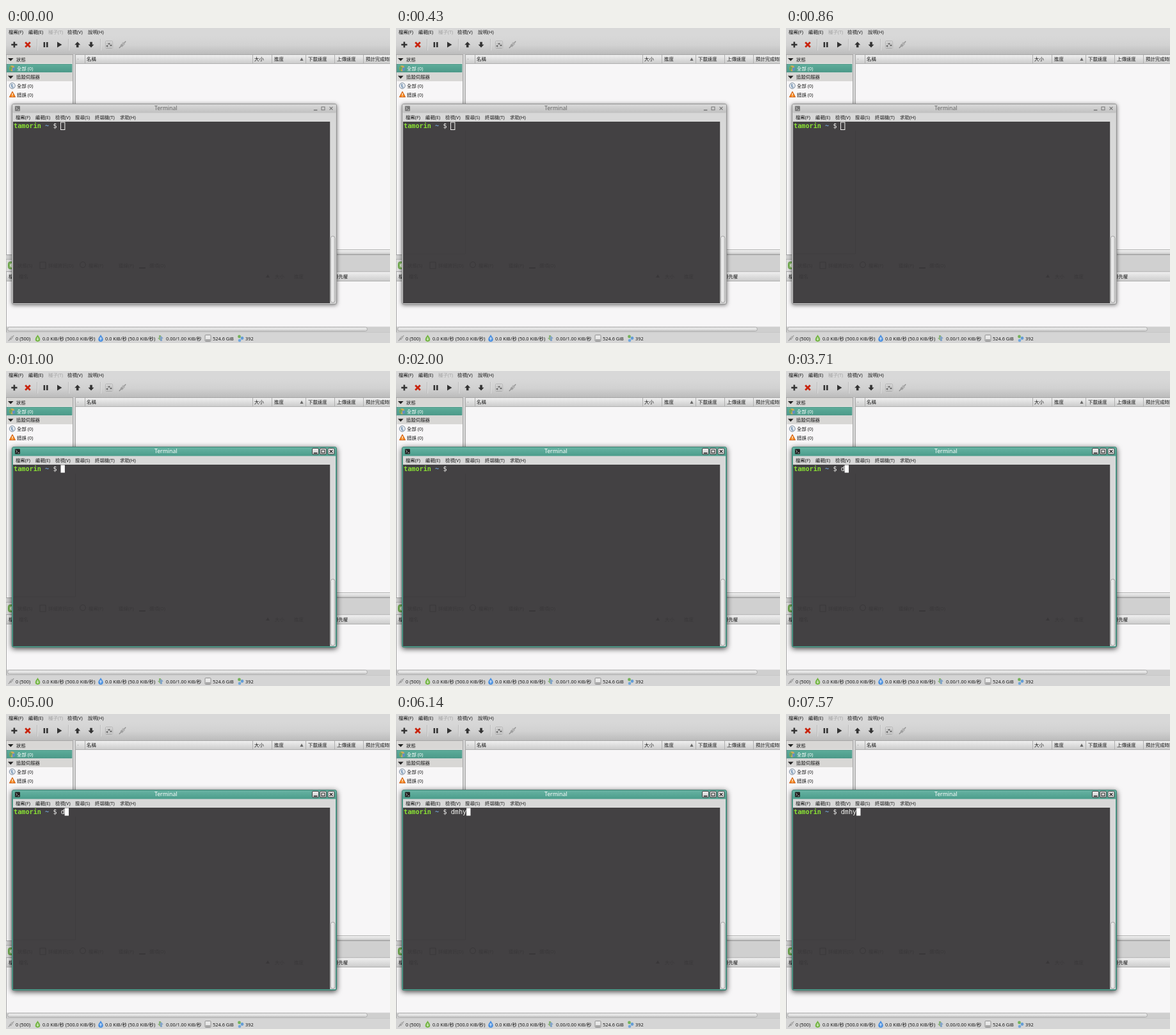
Write an HTML page that moves like this. It is 600 px wide and 491 px high and loops after 8 s.

```html
<!DOCTYPE html>
<html lang="zh-Hant">
<head>
<meta charset="utf-8">
<title>Terminal</title>
<style>
html, body { margin: 0; width: 100%; height: 100%; overflow: hidden; background: #d4d4d4; }
svg { display: block; width: 100vw; height: 100vh; }
text { font: 7.4px "Noto Sans", "Noto Sans CJK TC", "Noto Sans CJK", sans-serif; fill: #1c1c1c; white-space: pre; }
text.mono { font: 10.2px "DejaVu Sans Mono", monospace; fill: #f2f2f0; }
text.bold { font-weight: bold; }
text.title { font-size: 8.7px; }
.ghost text { fill: #000; }
#win { filter: drop-shadow(0 1.5px 3px rgba(0, 0, 0, .55)); }
#win.on { filter: drop-shadow(0 2.5px 4.5px rgba(0, 0, 0, .75)); }
#win .lit, #win.on .dim { display: none; }
#win.on .lit { display: inline; }
</style>
</head>
<body>
<svg id="stage" viewBox="0 0 600 491" xmlns="http://www.w3.org/2000/svg"></svg>
<script>
const LOOP = 8000, CELL = 6.14, TYPE_X = 85.7;

// time, typed text, cursor: 0 hidden, 1 block, 2 outline
const steps = [
  [0, '', 2], [1000, '', 1], [1860, '', 0], [2290, '', 1], [2860, '', 0],
  [3430, '', 1], [3710, 'd', 1], [4290, 'd', 0], [4860, 'd', 1],
  [5290, 'dm', 1], [5570, 'dmh', 1], [6140, 'dmhy', 1],
  [6710, 'dmhy', 0], [7430, 'dmhy', 1]
];
const FOCUS_AT = 1000, RATE_AT = 5860;

const rect = (x, y, w, h, fill, more = '') =>
  `<rect x="${x}" y="${y}" width="${w}" height="${h}" fill="${fill}" ${more}/>`;
const path = (d, fill, more = '') => `<path d="${d}" fill="${fill}" ${more}/>`;
const line = (d, color, w = 1, more = '') =>
  path(d, 'none', `stroke="${color}" stroke-width="${w}" ${more}`);
const disc = (x, y, r, fill, more = '') =>
  `<circle cx="${x}" cy="${y}" r="${r}" fill="${fill}" ${more}/>`;
const text = (x, y, s, more = '') => `<text x="${x}" y="${y}" ${more}>${s}</text>`;
const row = (y, items, more) => items.map(([x, s]) => text(x, y, s, more)).join('');
const group = (body, more) => `<g ${more}>${body}</g>`;
const grad = (id, ...colors) =>
  `<linearGradient id="${id}" x2="0" y2="1">${colors.map((c, i) =>
    `<stop offset="${i / (colors.length - 1)}" stop-color="${c}"/>`).join('')}</linearGradient>`;
const gradH = (id, a, b) =>
  `<linearGradient id="${id}"><stop stop-color="${a}"/><stop offset="1" stop-color="${b}"/></linearGradient>`;

const defs = `<defs>
  ${grad('bar', '#d8d8d8', '#d2d2d2', '#bcbcbc')}
  ${grad('head', '#efefef', '#dedede', '#cdcdcd')}
  ${grad('pick', '#5dac9a', '#4c9a89')}
  ${grad('teal', '#67b3a3', '#4b9d8b')}
  ${grad('gray', '#d9d9d9', '#c0c0c0')}
  ${grad('btn', '#f0f0f0', '#c6c6c6')}
  ${grad('thumb', '#f2f2f2', '#d0d0d0')}
  ${gradH('thumbV', '#f4f4f4', '#d8d8d8')}
</defs>`;

const plug = (x, y, k) => group(
  line('M-5 5L-2 2M2 -2L5 -5', '#888', 1.2) +
  path('M-3.5 1L-1 -1.5L1.8 1.3L-.8 3.6Z', '#a0a0a0') +
  path('M-1 -2L1 -4L4 -1L2 1Z', '#b0b0b0'), `transform="translate(${x} ${y}) scale(${k})"`);

const drop = (x, y, c, dir) =>
  path(`M${x} ${y - 5.5}C${x + 1} ${y - 3} ${x + 3.8} ${y - 1} ${x + 3.8} ${y + 1.8}A3.8 3.6 0 0 1 ${x - 3.8} ${y + 1.8}C${x - 3.8} ${y - 1} ${x - 1} ${y - 3} ${x} ${y - 5.5}`, c) +
  path(`M${x - 2.2} ${y + 1}h4.4l-2.2 ${3 * dir}zM${x - .7} ${y + 1}v${-2.4 * dir}h1.4v${2.4 * dir}z`, '#fff', 'opacity=".65"');

function toolbar() {
  const seps = [48, 97, 147].map(x =>
    line(`M${x + .5} 17V35`, '#bdbdbd') + line(`M${x + 1.5} 17V35`, '#dedede')).join('');
  const arrow = (x, k) => path(`M${x} ${26 - 4.5 * k}l4.5 ${4.8 * k}h-2.7v${4 * k}h-3.6v${-4 * k}h-2.7z`, '#333');
  const sliders = rect(155.5, 20.5, 11, 11, '#ececec', 'stroke="#a8a8a8" rx="1"') +
    [158, 161, 164].map((x, i) => line(`M${x} 22V31`, '#777', .9) +
      rect(x - 1.2, [27, 23.5, 26][i], 2.4, 2.2, '#555')).join('');
  return rect(0, 0, 600, 13, '#d8d8d8') + rect(0, 12, 600, 29, 'url(#bar)') +
    row(9, [[4, '檔案(F)'], [35, '編輯(E)'], [96, '檢視(V)'], [128, '說明(H)']]) +
    text(66, 9, '種子(T)', 'style="fill:#a4a4a4"') + seps +
    line('M8.3 26H17.5M12.9 21.4V30.6', '#333', 2.6) +
    line('M30.2 22.2L37.8 29.8M37.8 22.2L30.2 29.8', '#c8230c', 2.8) +
    rect(58.6, 22, 2.6, 8, '#333') + rect(63, 22, 2.6, 8, '#333') +
    path('M80 21.6L87.4 26L80 30.4Z', '#333') +
    arrow(111.7, 1) + arrow(133, -1) + sliders + plug(182, 26, 1.05);
}

function sidebar() {
  const head = (y, s) => rect(1.5, y, 102.5, 13.5, '#d8d7d5') +
    path(`M3 ${y + 5}h8.6l-4.3 4.6z`, '#222') + text(16, y + 9.8, s);
  return rect(0, 41, 105, 313, '#a6a6a6') + rect(1, 42, 103, 311, '#f7f6f7') +
    head(42, '狀態') + rect(1.5, 56.5, 101.5, 12.5, 'url(#pick)', 'stroke="#47907f" stroke-width=".8"') +
    disc(9.5, 63, 4.4, '#d9a958') + path('M6 59L10 61L8 67L5 65Z', '#6aa85a') +
    path('M10 62L14 61V66L10 67Z', '#5f8fc4') +
    text(17, 65.8, '全部 (0)', 'style="fill:#fff"') +
    head(69.5, '追蹤伺服器') +
    disc(9.8, 90, 4.5, '#e6ebf0', 'stroke="#7c8c9d" stroke-width="1"') +
    path('M7.5 87L11 88L10 90.5L12.5 92.5L9.5 93.5L8 91Z', '#8ba5c0') + text(17, 93, '全部 (0)') +
    path('M10 99L14.6 107.6H5.4Z', '#f58a20', 'stroke="#d05a0a" stroke-linejoin="round"') +
    line('M10 101.6V104.8M10 105.7V106.8', '#fff', 1.2) + text(17, 106.6, '錯誤 (0)');
}

function list() {
  const cols = [123, 385, 415, 468, 513, 558].map(x => line(`M${x + .5} 42V55`, '#b0b0b0')).join('');
  return rect(108, 41, 492, 313, '#a6a6a6') + rect(109, 42, 491, 303, '#f7f6f7') +
    rect(109, 42, 491, 13, 'url(#head)') + line('M109 55.5H600', '#b0b0b0') + cols +
    row(51, [[126, '名稱'], [388, '大小'], [419, '進度'], [472, '下載速度'], [517, '上傳速度'], [562, '預計完成時間']]) +
    path('M459.4 51L462 46L464.6 51Z', '#666') + rect(112, 48, 1, 1, '#999') +
    rect(109, 345, 491, 8, '#cfcfcf') +
    rect(109.5, 345.5, 500, 7, 'url(#thumb)', 'rx="3" stroke="#aaa" stroke-width=".8"');
}

function details() {
  return rect(0, 354, 600, 26, '#d0d0d0') + rect(0, 360.5, 80, 19, '#dedede', 'stroke="#b0b0b0"') +
    rect(3.5, 364.5, 11, 11, '#84bd62', 'rx="3" stroke="#5f9a40"') + disc(9, 370, 3, '#e8f5dd') +
    rect(0, 379.5, 600, 95, '#a6a6a6') + rect(1, 380.5, 599, 93, '#f7f6f7') +
    rect(1, 380.5, 599, 13.5, 'url(#head)') + line('M1 394.5H600', '#b0b0b0') +
    text(4, 390, '檔名') + text(512, 390, '優先權') +
    rect(1, 465.5, 599, 8, '#cfcfcf') +
    rect(2.5, 466.3, 562, 6.2, 'url(#thumb)', 'rx="3" stroke="#a0a0a0" stroke-width=".8"');
}

function status() {
  return rect(0, 474.5, 600, 16.5, '#d5d5d5') + plug(8, 483.5, .85) +
    drop(49.5, 483.5, '#74b544', 1) + drop(148, 483.5, '#4a90e0', -1) +
    path('M239 479h3v4h2l-3.5 4-3.5-4h2z', '#8ab573') + path('M244 488h-3v-4h-2l3.5-4 3.5 4h-2z', '#86a5c8') +
    rect(311, 478.5, 9, 10, '#e8e8e8', 'rx="1.2" stroke="#888" stroke-width=".9"') +
    rect(311.5, 485, 8, 3, '#aaa') +
    disc(364.5, 481, 2.4, '#74b25a') + disc(369, 483.5, 2.4, '#659dd6') + disc(365, 487, 2.3, '#73a8dc') +
    row(486.5, [[15, '0 (500)'], [57, '0.0 KiB/秒 (500.0 KiB/秒)'], [155, '0.0 KiB/秒 (50.0 KiB/秒)'], [323, '524.6 GiB'], [374, '392']]) +
    text(250, 486.5, '', 'id="rate"');
}

function ghosts() {
  return group(
    row(373, [[18, '狀態(S)'], [66, '詳細資訊(D)'], [129, '檔案(F)'], [176, '連線(P)'], [224, '選項(O)']]) +
    row(390, [[20, '檔名'], [420, '大小'], [450, '進度']]) +
    rect(53, 365, 9, 10, 'none', 'stroke="#000"') + disc(120, 369, 4.5, 'none', 'stroke="#000"') +
    line('M208 374H218', '#000', 2) +
    path('M406 389l3 -5l3 5z', '#000'), 'class="ghost" opacity=".14"') +
    line('M108.5 160V352H12', '#000', 1, 'id="edge"');
}

// boxed: whether the title buttons have a raised face
function frame(kind, fill, edge, ink, mark, boxed) {
  const button = x => rect(x + .5, 120.5, 10, 9.5, 'url(#btn)', `rx="1.5" stroke="${mark}" stroke-width=".8"`);
  return group(
    rect(9.5, 118.5, 507, 312, fill, `rx="2.5" stroke="${edge}"`) +
    rect(10, 119, 506, 13.5, `url(#${kind})`, 'rx="2"') +
    rect(14, 121.5, 8, 8, boxed ? '#222' : '#777', 'rx="1"') +
    line('M15.5 123.5l2 1.8l-2 1.8M18.4 127.6h2.4', '#ddd', .8) +
    text(232, 128.4, 'Terminal', `class="title" style="fill:${ink}"`) +
    (boxed ? [478, 490, 502.5].map(button).join('') : '') +
    line('M480.8 128H486.4', mark, 1.5) +
    rect(493, 123, 5, 4.8, 'none', `stroke="${mark}"`) +
    line('M505.6 122.8l4.8 4.8M510.4 122.8l-4.8 4.8', mark, 1.2),
    `class="${kind === 'teal' ? 'lit' : 'dim'}"`);
}

function terminal() {
  return group(
    frame('gray', '#cecece', '#949494', '#666', '#777', false) +
    frame('teal', '#52a190', '#3f8172', '#fff', '#222', true) +
    rect(11, 132.5, 504, 296.5, '#d8d8d8') +
    row(142, [[15, '檔案(F)'], [46, '編輯(E)'], [77, '檢視(V)'], [108, '搜尋(S)'], [139, '終端機(T)'], [178, '求助(H)']]) +
    rect(11, 146, 495, 283, '#434143') + ghosts() +
    rect(506, 146, 9, 283, '#d9d9d9') + line('M506.5 146V429', '#b4b4b4') +
    rect(507.5, 324.5, 6.5, 103.5, 'url(#thumbV)', 'rx="3" stroke="#999" stroke-width=".9"') +
    text(12, 156, 'tamorin', 'class="mono bold" style="fill:#8ae234"') +
    text(12 + 8 * CELL, 156, '~', 'class="mono bold" style="fill:#729fcf"') +
    text(12 + 10 * CELL, 156, '$', 'class="mono"') +
    text(TYPE_X, 156, '', 'class="mono" id="typed"') +
    rect(0, 146.5, 6.4, 12, '#fff', 'id="block"') +
    rect(TYPE_X - .2, 147, 6.4, 11.5, 'none', 'id="hollow" stroke="#f2f2f0"'), 'id="win"');
}

const $ = id => document.getElementById(id);
$('stage').innerHTML = defs + rect(0, 0, 600, 491, '#d4d4d4') +
  toolbar() + sidebar() + list() + details() + status() + terminal();

const [win, typed, block, hollow, rate, edge] =
  ['win', 'typed', 'block', 'hollow', 'rate', 'edge'].map($);

function draw(t) {
  const [, word, cursor] = steps.filter(s => s[0] <= t).pop();
  win.classList.toggle('on', t >= FOCUS_AT);
  typed.textContent = word;
  block.setAttribute('x', TYPE_X + word.length * CELL - .2);
  block.style.display = cursor === 1 ? '' : 'none';
  hollow.style.display = cursor === 2 ? '' : 'none';
  rate.textContent = `0.00/${t < RATE_AT ? '1.00' : '0.00'} KiB/秒`;
  edge.setAttribute('opacity', .06 * Math.min(1, t / 860));
}

const start = performance.now();
function tick() {
  draw((performance.now() - start) % LOOP);
  requestAnimationFrame(tick);
}
tick();
</script>
</body>
</html>
```
